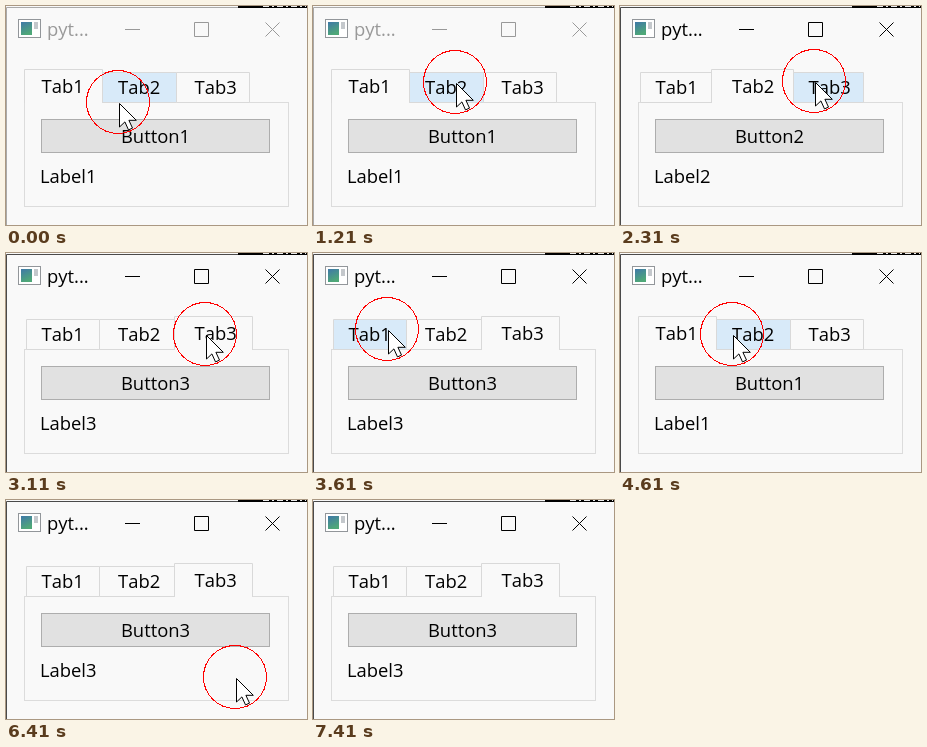
These frames come from a looping animation (301 px wide and 219 px high, 7510 ms). An HTML page:

```html
<!DOCTYPE html>
<html lang="en">
<head>
<meta charset="utf-8">
<title>Tab widget</title>
<style>
  html, body { margin: 0; width: 100%; height: 100%; overflow: hidden; background: #f9f9f9; }
  svg { display: block; width: 301px; height: 219px; }
  text { font: 18.4px "Open Sans", "Noto Sans", sans-serif; font-kerning: none; fill: #000; }
  .tab { stroke: #d9d9d9; }
  #title { fill: var(--ink); }
  #controls { fill: none; stroke: var(--ink); }
  #frame { fill: none; stroke: var(--edge); }
</style>
</head>
<body>
<svg id="stage" viewBox="0 0 301 219">
  <rect width="301" height="219" fill="#f9f9f9"/>
  <path id="frame" d="M.5 219V1.5H301"/>
  <path d="M232 0h69v2h-69z" fill="#000"/>
  <path d="M257 .5h43" stroke="#eee" stroke-dasharray="6 3 2 3"/>

  <g id="icon">
    <rect x="12.5" y="13.5" width="22" height="18" fill="#fff" stroke="#92969a"/>
    <path d="M15 16h11v13H15z" fill="url(#teal)"/>
    <path d="M28 16h4v7h-4z" fill="#c4c8cc"/>
  </g>
  <defs>
    <linearGradient id="teal" x2=".4" y2="1">
      <stop stop-color="#3f78a8"/><stop offset="1" stop-color="#4fa878"/>
    </linearGradient>
  </defs>
  <text id="title" x="41" y="30">pyt...</text>
  <path id="controls" d="M119 23.5h15M188.5 16.5h14v14h-14zM259.5 16.5l14 14M273.5 16.5l-14 14"/>

  <rect x="18.5" y="96.5" width="264" height="104" fill="#f9f9f9" stroke="#dcdcdc"/>
  <g id="tabs"></g>
  <rect x="35.5" y="113.5" width="228" height="33" fill="#e1e1e1" stroke="#adadad"/>
  <text id="button" x="149.5" y="137" text-anchor="middle"></text>
  <text id="label" x="34" y="177"></text>

  <g id="pointer">
    <circle r="31.5" fill="none" stroke="#f00" shape-rendering="crispEdges"/>
    <path d="M1.5 1.5V25L6.9 19.9 10.5 27.9 14.5 26.1 10.9 18.3H18.3Z" fill="#fff" stroke="#000"/>
  </g>
</svg>
<script>
const LOOP = 7510, STEP = 100;
const $ = id => document.getElementById(id);

// pointer moves: [first step at, number of steps, to x, to y]
const moves = [
  [210, 3, 149, 74], [1210, 1, 142, 76], [1310, 1, 141, 75],
  [2010, 4, 194, 75], [2410, 1, 211, 81], [2810, 1, 209, 81],
  [3110, 6, 74, 76], [4010, 1, 72, 76], [4410, 3, 112, 81],
  [5210, 5, 187, 83], [5810, 1, 189, 83], [6110, 8, 268, 270]
];
const clicks = [1610, 2810, 4210, 4910, 5810];   // each selects the next tab
const cuts = [20, 93, 170, 243];                 // tab borders before the selected one grows

const smooth = p => p * p * (3 - 2 * p);

function pointerAt(t) {
  let x = 112, y = 96;
  for (const [start, steps, toX, toY] of moves) {
    if (t < start) break;
    const done = Math.min(steps, Math.floor((t - start) / STEP) + 1);
    const p = smooth(done / steps);
    x += (toX - x) * p;
    y += (toY - y) * p;
  }
  return [Math.round(x), Math.round(y)];
}

function set(el, attrs) {
  for (const key in attrs) el.setAttribute(key, attrs[key]);
}
function make(name, attrs, parent) {
  const el = document.createElementNS("http://www.w3.org/2000/svg", name);
  set(el, attrs);
  return parent.appendChild(el);
}

const tabs = [0, 1, 2].map(i => {
  const box = make("path", { class: "tab" }, $("tabs"));
  const text = make("text", { x: 35.5 + 76.5 * i }, $("tabs"));
  text.textContent = "Tab" + (i + 1);
  return { box, text };
});

function drawTabs(sel, x, y) {
  const borders = cuts.map((c, i) => c + (i === sel ? -2 : i === sel + 1 ? 3 : 0));
  tabs.forEach(({ box, text }, i) => {
    const l = borders[i], r = borders[i + 1];
    const on = i === sel;
    const hover = !on && x >= l && x <= r && y >= 64 && y <= 97;
    const top = on ? 63.5 : 66.5;
    const bottom = on ? 97 : 96.5;
    set(box, {
      d: `M${l + .5} ${bottom}V${top}H${r + .5}V${bottom}` + (on ? "" : "Z"),
      fill: hover ? "#d8eaf9" : "#f9f9f9"
    });
    set(text, { y: on ? 87 : 88 });
  });
}

function draw(now) {
  const t = now % LOOP;
  const [x, y] = pointerAt(t);
  const sel = clicks.filter(c => c <= t).length % 3;
  const focus = t >= clicks[0] && !(t >= 7210 && t < 7410);

  $("stage").style.setProperty("--ink", focus ? "#000" : "#999");
  $("stage").style.setProperty("--edge", focus ? "#4a4a4a" : "#aaa");
  drawTabs(sel, x, y);
  $("button").textContent = "Button" + (sel + 1);
  $("label").textContent = "Label" + (sel + 1);
  set($("pointer"), { transform: `translate(${x} ${y})` });
}

const start = performance.now();
function tick() {
  draw(performance.now() - start);
  requestAnimationFrame(tick);
}
tick();
</script>
</body>
</html>
```
